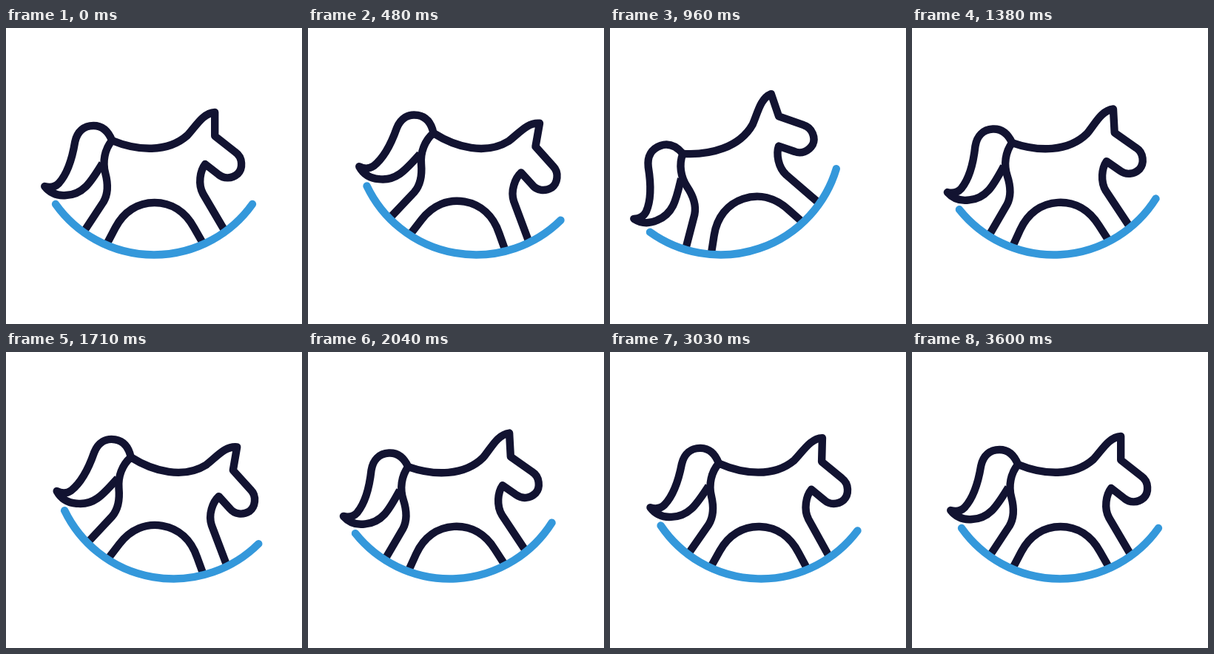
An HTML page for the animation above (3630 ms loop, 400 by 400 pixels).

```html
<!DOCTYPE html>
<html lang="en">
<head>
<meta charset="utf-8">
<title>Rocking horse</title>
<style>
  html, body { margin: 0; width: 100%; height: 100%; overflow: hidden; background: #fff; }
  svg { display: block; width: 100vw; height: 100vh; }
  path { fill: none; stroke-width: 10.4; stroke-linejoin: round; }
  .horse path { stroke: #121331; }
  .rocker { stroke: #3498db; stroke-linecap: round; }
</style>
</head>
<body>
<svg viewBox="0 0 400 400">
  <g id="toy">
    <g class="horse">
      <!-- tail -->
      <path d="M144 152C138 137 129 132 119 132C106 132 97 140 94 154C90 178 82 199 72 210C67 215 60 216 53 214C61 224 72 227 82 226C106 225 116 207 131 183"/>
      <!-- hind leg, back, head and front leg -->
      <path d="M105.500 276L132.500 235C139 224 139 211 135 196C131 181 134 164 144 152C178 166 219 169 246 145C258 132 267 115 283 114V146L311 168C321 175 321 190 314 197C306 204 295 204 288 198L270 184C263 193 260 211 267 224L297 275"/>
      <!-- belly -->
      <path d="M137.500 291L148.500 270C160 248 179 236 201.500 236C224 236 243 248 255 270L267 291"/>
    </g>
    <path class="rocker" d="M67.800 238A163.400 163.400 0 0 0 333.800 238"/>
  </g>
</svg>
<script>
  const STEP = 30, STEPS = 121;
  const CENTER = [200.8, 143.5];
  const REST_X = -0.8;
  const ROLL = 2.69; // horizontal travel per degree
  // [step, angle] at each turning point of the swing
  const swing = [[0, 0], [17, 10.1], [34.6, -20.4], [55.6, 10], [73, -6.2], [91, 5.3], [109, -1.2], [120, 0], [121, 0]];
  const toy = document.getElementById("toy");

  function angleAt(step) {
    const i = swing.findIndex(([s]) => s > step);
    const [s0, a0] = swing[i - 1], [s1, a1] = swing[i];
    const eased = (1 - Math.cos(Math.PI * (step - s0) / (s1 - s0))) / 2;
    return a0 + (a1 - a0) * eased;
  }

  function draw() {
    const angle = angleAt(Math.floor(performance.now() / STEP) % STEPS);
    toy.setAttribute("transform", `translate(${REST_X + ROLL * angle} 0) rotate(${angle} ${CENTER})`);
    requestAnimationFrame(draw);
  }
  draw();
</script>
</body>
</html>
```
